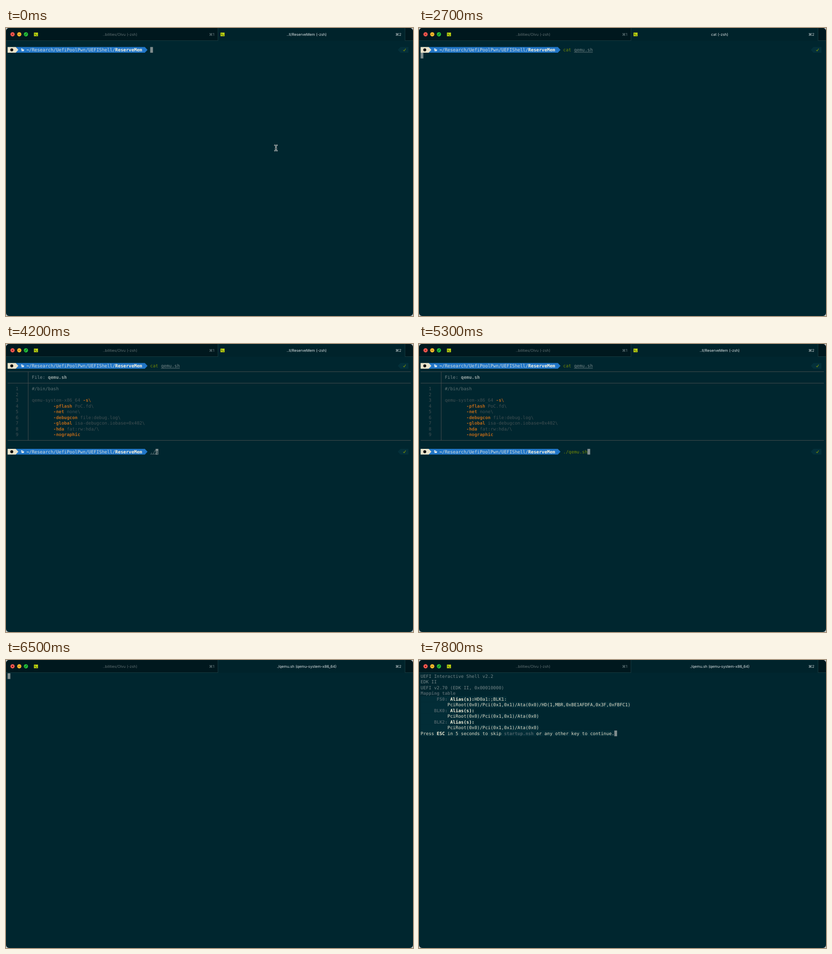
Recreate the animation shown at these times as an HTML page with a canvas. Size 890 by 629 pixels, loop 8 s.

```html
<!DOCTYPE html>
<html lang="en">
<head>
<meta charset="utf-8">
<title>Terminal session</title>
<style>
html, body { margin: 0; width: 100%; height: 100%; overflow: hidden; background: #c3caca; }
canvas { display: block; }
</style>
</head>
<body>
<canvas id="stage" width="890" height="629"></canvas>
<script>
const W = 890, H = 629, LOOP = 8000;
const CELL = 5.884, LINE = 12.5, LEFT = 3.5, TOP = 29;
const MONO = '9.77px "DejaVu Sans Mono", monospace';
const SANS = '8.15px Inter, "DejaVu Sans", sans-serif';
const CMD = 53;

const C = {
  bg: '#00262f', tab: '#00232b', idle: '#00181e', edge: '#17393f',
  text: '#748587', dim: '#425053', rule: '#444b4c', orange: '#b9681a',
  green: '#738a05', red: '#bd3613', blue: '#2176c7', cream: '#eae3cb',
  bright: '#fcf4dc', slate: '#4b6067', cursor: '#7f8c8d', cell: '#022d37'
};

const ctx = document.getElementById('stage').getContext('2d');

// [time, typed text, cursor offset]; a cursor may sit on the newest character
const CAT_KEYS = [
  [0, '', 0], [700, 'c', 0], [800, 'ca', 1], [900, 'cat', 2], [1000, 'cat', 3],
  [1200, 'cat ', 4], [1500, 'cat q', 4], [1600, 'cat q', 5], [1900, 'cat qe', 6],
  [2100, 'cat qemu.sh', 11], [2600, 'cat qemu.sh', -1]
];
const RUN_KEYS = [
  [0, '', 0], [4000, './', 1], [4200, './q', 2], [4600, './q', 3], [4800, './qe', 4],
  [4900, './qem', 5], [5100, './qemu', 6], [5200, './qemu.sh', 9], [5500, './qemu.sh', -1]
];
const TITLES = [
  [0, '..ll/ReserveMem (-zsh)'], [2600, 'cat (-zsh)'], [2900, '..ll/ReserveMem (-zsh)'],
  [5500, './qemu.sh (-zsh)'], [6000, './qemu.sh (qemu-system-x86_64)']
];

const SCRIPT = [
  [['#/bin/bash', '#5f7072']],
  [],
  [['qemu-system-x86_64 ', C.dim], ['-s\\', C.orange, 1]],
  ...[['-pflash', 'PoC.fd\\'], ['-net', 'none\\'], ['-debugcon', 'file:debug.log\\'],
    ['-global', 'isa-debugcon.iobase=0x402\\'], ['-hda', 'fat:rw:hda/\\'], ['-nographic', '']
  ].map(([flag, value]) => [['        ' + flag, C.orange, 1], [' ' + value, C.dim]])
];

const ADVICE = [
  '         Automatically detecting the format is dangerous for raw images, write operations on block 0 will be restricted.',
  "         Specify the 'raw' format explicitly to remove the restrictions."
];
const WARN_FLASH = [
  "WARNING: Image format was not specified for 'PoC.fd' and probing guessed raw.", ...ADVICE
];
const WARN_DISK = [
  'WARNING: Image format was not specified for \'json:{"fat-type": 0, "dir": "hda/", "driver": "vvfat", "floppy": false, "rw": true, "write-target": {"dri',
  'ver": "qcow", "file": {"driver": "file", "filename": "/var/folders/wb/8gjp3pzs4039gwfm4lfcth8c0000gn/T//vl.LT42DN"}}}\' and probing guessed raw.',
  ...ADVICE
];
const BOOT = [
  'BdsDxe: failed to load Boot0001 "UEFI QEMU DVD-ROM QM00003 " from PciRoot(0x0)/Pci(0x1,0x1)/Ata(Secondary,Master,0x0): Not Found',
  'BdsDxe: loading Boot0002 "EFI Internal Shell" from Fv(7CB8BDC9-F8EB-4F34-AAEA-3EE4AF6516A1)/FvFile(7C04A583-9E3E-4F1C-AD65-E05268D0B4D1)'
];
const BANNER = ['UEFI Interactive Shell v2.2', 'EDK II', 'UEFI v2.70 (EDK II, 0x00010000)'];
const DEVICES = [
  ['      FS0: ', 'HD0a1:;BLK1:', '/HD(1,MBR,0xBE1AFDFA,0x3F,0xFBFC1)'],
  ['     BLK0: ', '', ''],
  ['     BLK2: ', '', '']
];

const colX = col => LEFT + col * CELL;
const rowY = row => TOP + row * LINE;
const midY = row => rowY(row) + LINE / 2;
const at = (list, t) => list.filter(e => e[0] <= t).pop();

function rect(x, y, w, h, color) {
  ctx.fillStyle = color;
  ctx.fillRect(x, y, w, h);
}

function poly(points, color) {
  ctx.fillStyle = color;
  ctx.beginPath();
  points.forEach(([x, y]) => ctx.lineTo(x, y));
  ctx.fill();
}

function disc(x, y, r, color) {
  ctx.fillStyle = color;
  ctx.beginPath();
  ctx.arc(x, y, r, 0, 7);
  ctx.fill();
}

function stroke(points, color, width) {
  ctx.strokeStyle = color;
  ctx.lineWidth = width;
  ctx.beginPath();
  points.forEach(([x, y], i) => i % 2 ? ctx.lineTo(x, y) : ctx.moveTo(x, y));
  ctx.stroke();
}

// Writes text on the terminal grid and returns the next column.
function put(row, col, text, color = C.text, bold = 0) {
  ctx.font = (bold ? 'bold ' : '') + MONO;
  ctx.fillStyle = color;
  ctx.textAlign = 'left';
  for (const ch of text) {
    if (ch !== ' ') ctx.fillText(ch, colX(col), rowY(row) + 9.8);
    col++;
  }
  return col;
}

function putRuns(row, col, runs, back) {
  if (back) rect(LEFT, rowY(row), CELL * runs.reduce((n, r) => n + r[0].length, 0), LINE, back);
  return runs.reduce((c, run) => put(row, c, ...run), col);
}

const putLines = (row, lines) => lines.forEach((s, i) => put(row + i, 0, s));

function cursor(row, col, ch = '') {
  rect(colX(col), rowY(row), 6, LINE, C.cursor);
  put(row, col, ch, '#00232b');
}

function label(text, x, color, align = 'center') {
  ctx.font = SANS;
  ctx.fillStyle = color;
  ctx.textAlign = align;
  ctx.fillText(text, x, 17);
}

function sessionIcon(x) {
  rect(x, 10, 9, 8, '#b9cf12');
  stroke([[x + 1.5, 12], [x + 3.7, 13.8], [x + 3.7, 13.8], [x + 1.5, 15.6],
    [x + 4.5, 15.8], [x + 7.3, 15.8]], '#26300a', 1);
}

function lights(busy) {
  disc(14.3, 13.8, 4.6, '#fc5b53');
  disc(29, 13.8, 4.6, '#fdbb2d');
  disc(43.6, 13.8, 4.6, '#27c53d');
  if (busy) disc(14.3, 13.8, 1.6, '#6d0f0a');
  else stroke([[12.4, 11.9], [16.2, 15.7], [16.2, 11.9], [12.4, 15.7]], '#6d0f0a', 1);
  stroke([[26.4, 13.8], [31.6, 13.8]], '#8a5a08', 1.1);
  poly([[41.3, 12.8], [41.3, 16.1], [44.6, 16.1]], '#0b5a16');
  poly([[42.6, 11.5], [45.9, 11.5], [45.9, 14.8]], '#0b5a16');
}

function tabBar(t) {
  const busy = t >= 6000;
  rect(0, 0, 463, 27, C.idle);
  rect(463, 0, 410, 28, C.tab);
  rect(873, 0, 17, 27, C.idle);
  rect(0, 27, 464, 1, C.edge);
  rect(463, 0, 1, 28, C.edge);
  rect(872, 0, 1, 28, C.edge);
  rect(872, 27, 18, 1, C.edge);
  lights(busy);
  sessionIcon(61);
  if (!busy) sessionIcon(469);
  label('..bilities/Olvu (-zsh)', 249.5, '#617073');
  label('⌘1', 455.5, '#74878a', 'right');
  label(at(TITLES, t)[1], 657.5, '#dfe5e6');
  label('⌘2', 864.5, '#d0d8d9', 'right');
}

function prompt(row) {
  const y = rowY(row), b = y + LINE, m = midY(row);
  const arrow = (from, to, color) =>
    poly([[from, y], [colX(to), y], [colX(to + 1), m], [colX(to), b], [from, b]], color);
  arrow(colX(3), 51, C.blue);
  arrow(LEFT, 3, C.cream);
  disc(12.6, m, 3.2, '#0a0a0a');

  poly([[33, m - 3], [35.3, m - 3], [36, m - 2], [38, m - 2], [38, m - 1], [34.5, m - 1],
    [33.4, m + 2]], '#e6edf0');
  poly([[35, m - 0.4], [40, m - 0.4], [38.6, m + 2.8], [33.6, m + 2.8]], '#e6edf0');

  putRuns(row, 7, [['~', C.bright, 1], ['/Research/UefiPoolPwn/UEFIShell/', '#d3dcdc'],
    ['ReserveMem', C.bright, 1]]);

  poly([[colX(145), m], [colX(146), y], [880, y], [880, b], [colX(146), b]], '#04303a');
  stroke([[868.8, m + 0.3], [870.6, m + 2.6], [870.6, m + 2.6], [874, m - 2.8]], C.green, 1.2);
}

function underline(row, from, to) {
  if (to > from) rect(colX(from), rowY(row) + 11, (to - from) * CELL, 1, '#64767a');
}

// Typed command with its cursor; words up to `split` count as the program name.
function command(row, [, text, pos], split, color, lineFrom) {
  put(row, CMD, text.slice(0, split), color);
  put(row, CMD + split, text.slice(split));
  if (lineFrom >= 0) underline(row, CMD + lineFrom, CMD + text.length);
  if (pos >= 0) cursor(row, CMD + pos, text[pos]);
  else if (row === 1) return;
}

function listing() {
  for (const row of [2, 4, 14]) rect(LEFT, Math.floor(midY(row)), 882, 1, C.rule);
  rect(48, 60, 1, 150, C.rule);
  putRuns(3, 9, [['File: ', '#7a8a8c'], ['qemu.sh', '#9aa7a5', 1]]);
  SCRIPT.forEach((runs, i) => {
    put(5 + i, 3, String(i + 1), C.dim);
    putRuns(5 + i, 9, runs);
  });
}

function shell(t) {
  const cat = at(CAT_KEYS, t);
  prompt(1);
  command(1, cat, 3, t < 1000 ? C.red : C.green, 4);
  if (t >= 2600 && t < 2800) cursor(2, 0);
  if (t < 2800) return;

  listing();
  if (t < 2900) return cursor(15, 0);

  const run = at(RUN_KEYS, t), done = run[1] === './qemu.sh';
  prompt(16);
  command(16, run, 9, done ? C.green : C.text, done ? -1 : 0);
  if (t < 5500) return;

  if (t >= 5700) putLines(17, WARN_FLASH);
  if (t >= 5800) putLines(20, WARN_DISK);
  cursor(t >= 5800 ? 24 : t >= 5700 ? 20 : 17, 0);
}

function firmware(t) {
  if (t < 7300) {
    const lines = BOOT.slice(0, t < 7100 ? 0 : t < 7200 ? 1 : 2);
    putLines(0, lines);
    return cursor(lines.length, 0);
  }
  putLines(0, BANNER);
  if (t < 7400) return cursor(3, 0);

  const pale = '#e4dfca';
  put(3, 0, 'Mapping table', C.slate, 1);
  DEVICES.forEach(([name, alias, tail], i) => {
    const row = 4 + i * 2;
    putRuns(row, 0, [[name, C.slate, 1], ['Alias(s):', C.bright, 1], [alias, pale]], C.cell);
    const path = `          PciRoot(0x0)/Pci(0x1,0x1)/Ata(0x0)${tail}`;
    putRuns(row + 1, 0, [[path, pale]], C.cell);
  });
  if (t < 7500) return cursor(10, 0);

  cursor(10, putRuns(10, 0, [['Press ', pale], ['ESC', C.bright, 1], [' in 5 seconds to skip ', pale],
    ['startup.nsh', C.slate, 1], [' or any other key to continue.', pale]], C.cell));
}

function pointer(x, y) {
  const bars = [[x - 3.5, y - 6.5], [x - 1, y - 5.5], [x + 3.5, y - 6.5], [x + 1, y - 5.5],
    [x, y - 5.5], [x, y + 5.5], [x - 2, y + 1.5], [x + 2, y + 1.5],
    [x - 3.5, y + 6.5], [x - 1, y + 5.5], [x + 3.5, y + 6.5], [x + 1, y + 5.5]];
  stroke(bars, '#e8eeee', 2.8);
  stroke(bars, '#10191b', 1);
}

function draw(t) {
  ctx.clearRect(0, 0, W, H);
  ctx.save();
  ctx.beginPath();
  ctx.roundRect(0, 0, W, H, 7);
  ctx.clip();
  rect(0, 0, W, H, C.bg);
  tabBar(t);
  if (t < 6300) shell(t);
  else firmware(t);
  if (t < 700) pointer(590.3, 262);
  ctx.restore();
}

ctx.textRendering = 'geometricPrecision';
const start = performance.now();
function tick() {
  draw((performance.now() - start) % LOOP);
  requestAnimationFrame(tick);
}
tick();
</script>
</body>
</html>
```
